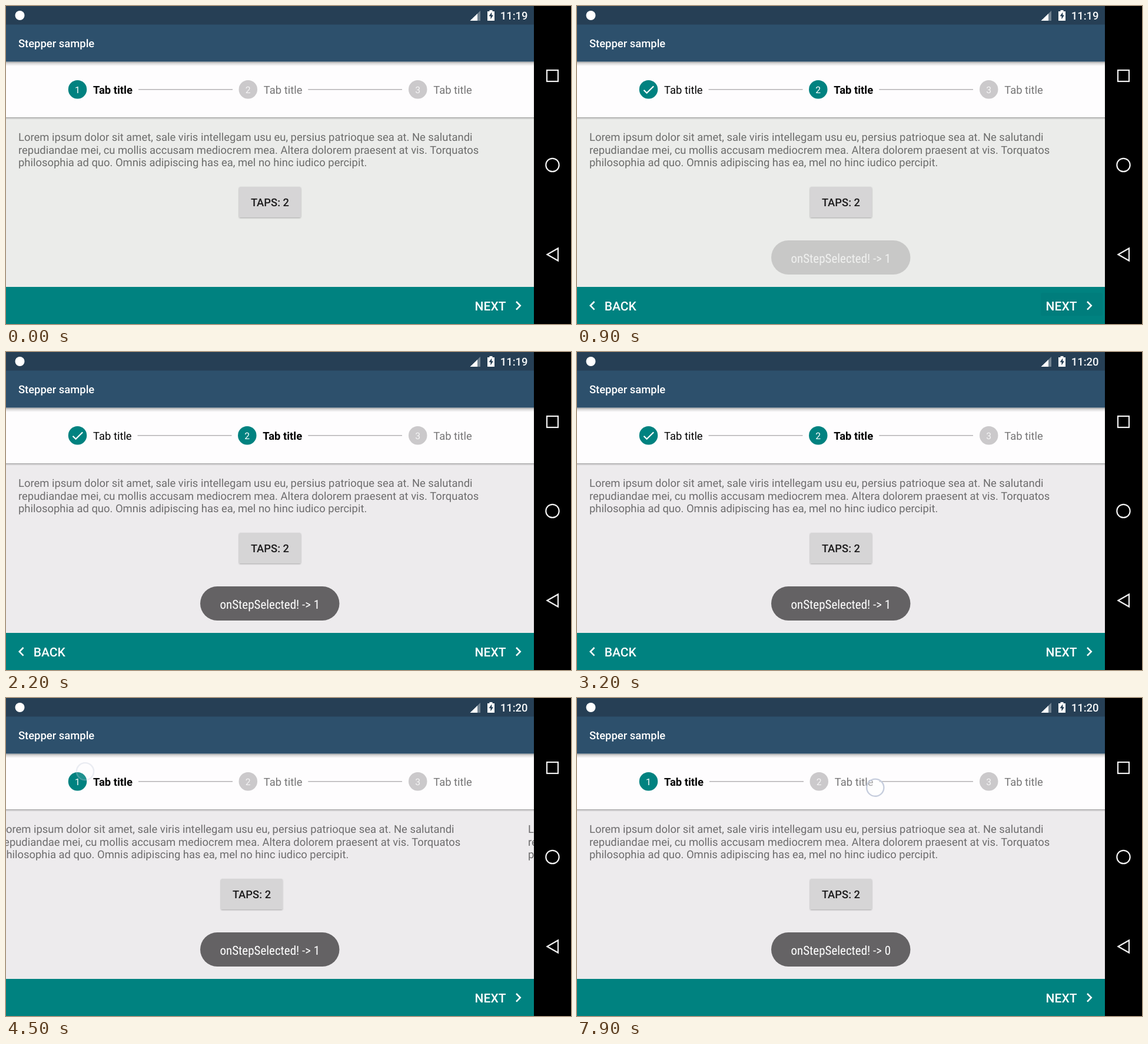
Recreate the animation shown at these times as an HTML page. Size 960 by 540 pixels, loop 8000 ms.

```html
<!DOCTYPE html>
<html lang="en">
<head>
<meta charset="utf-8">
<title>Stepper sample</title>
<style>
  html, body { margin: 0; width: 100%; height: 100%; overflow: hidden; background: #000; }
  svg { display: block; width: 960px; height: 540px; }
  text { font: 400 18.42px Roboto, sans-serif; white-space: pre; text-rendering: geometricPrecision; }
  .medium { font-weight: 500; }
  .action { font-weight: 500; font-size: 21px; fill: #fff; }
  .line { fill: none; stroke: #fff; stroke-width: 2.6; }
  .nav { fill: none; stroke: #f2f2f2; stroke-width: 2.2; }
  .toast text { font-family: "Roboto Condensed", Roboto, sans-serif; font-stretch: 75%; font-size: 21px; fill: #fff; }
  .number { font-size: 15.75px; fill: #fff; text-anchor: middle; }
</style>
</head>
<body>
<svg viewBox="0 0 960 540">
  <defs>
    <linearGradient id="shade" x2="0" y2="1">
      <stop stop-color="#000" stop-opacity=".36"/>
      <stop offset=".4" stop-color="#000" stop-opacity=".14"/>
      <stop offset="1" stop-color="#000" stop-opacity="0"/>
    </linearGradient>
    <filter id="lift" x="-10%" y="-15%" width="120%" height="135%">
      <feDropShadow dx="0" dy="1" stdDeviation="1.2" flood-opacity=".3"/>
    </filter>
    <clipPath id="screen"><rect width="897" height="540"/></clipPath>
    <g id="page">
      <g fill="#000" fill-opacity=".54">
        <text x="21" y="229.4">Lorem ipsum dolor sit amet, sale viris intellegam usu eu, persius patrioque sea at. Ne salutandi</text>
        <text x="21" y="250.9">repudiandae mei, cu mollis accusam mediocrem mea. Altera dolorem praesent at vis. Torquatos</text>
        <text x="21" y="272.4">philosophia ad quo. Omnis adipiscing has ea, mel no hinc iudico percipit.</text>
      </g>
      <rect x="396" y="307" width="105" height="52" rx="2.6" fill="#d6d5d6" filter="url(#lift)"/>
      <text class="medium" x="448.5" y="340" text-anchor="middle" fill="#1c1b1c">TAPS: 2</text>
    </g>
  </defs>

  <g clip-path="url(#screen)">
    <rect id="back" width="897" height="540"/>
    <use id="first" href="#page"/>
    <use id="second" href="#page"/>

    <rect y="189" width="897" height="4" fill="url(#shade)"/>
    <rect y="90" width="897" height="99" fill="#fefdfe"/>
    <rect y="94.5" width="897" height="7.5" fill="url(#shade)"/>
    <g id="tabs"></g>

    <rect width="897" height="94.5" fill="#2d506c"/>
    <rect width="897" height="31.5" fill="#263f55"/>
    <text class="medium" x="21" y="70" fill="#fff">Stepper sample</text>
    <circle cx="23.5" cy="16" r="8" fill="#fff"/>
    <path d="M788.5 25L806 8V25Z" fill="#fff" fill-opacity=".35"/>
    <path d="M788.5 25L801 13V25Z" fill="#fff"/>
    <path d="M818 9H821.5V7H826.5V9H830V25H818Z" fill="#fff"/>
    <path d="M825.3 10.5L820.5 17.3H823.4V22.5L828 15.6H825.3Z" fill="#263f55"/>
    <text id="clock" class="medium" x="886.5" y="22.7" text-anchor="end" fill="#f7f9fa"></text>

    <rect y="477" width="897" height="63" fill="#008280"/>
    <rect id="press" x="788" y="487" width="105" height="39" rx="2.6"/>
    <text class="action" x="796.6" y="516.8">NEXT</text>
    <path class="line" d="M867 502L873.7 508.8L867 515.6"/>
    <g id="previous">
      <text class="action" x="46.8" y="516.8">BACK</text>
      <path class="line" d="M29.5 502L22.8 508.8L29.5 515.6"/>
    </g>

    <g class="toast" id="toast1">
      <rect x="330" y="398" width="236.5" height="58" rx="29" fill="#646264"/>
      <text x="363.5" y="435.5">onStepSelected! -&gt; 1</text>
    </g>
    <g class="toast" id="toast0">
      <rect x="330" y="398" width="236.5" height="58" rx="29" fill="#656365"/>
      <text x="363.5" y="435.5">onStepSelected! -&gt; 0</text>
    </g>
    <circle id="touch" r="14.6" fill="#fff" fill-opacity=".35" stroke="#c6cddd" stroke-width="2.4"/>
  </g>

  <rect x="897" width="63" height="540"/>
  <rect class="nav" x="919" y="109" width="19" height="19"/>
  <circle class="nav" cx="928.5" cy="270" r="11.2"/>
  <path class="nav" d="M938 411.5V432.5L919.5 422Z"/>
</svg>

<script>
const LOOP = 8000, STEP = 100, WIDTH = 897;
const FORWARD = 702, BACKWARD = 4402;
const TAB_Y = 141.75;
const touches = [
  { at: 500, x: 845, y: 511 },
  { at: 4200, x: 134.5, y: 124.7 },
  { at: 7900, x: 506.8, y: 152.2 }
];
const $ = id => document.getElementById(id);
const clamp = v => Math.min(1, Math.max(0, v));
const mix = (a, b, p) => a + (b - a) * p;
const easeSlide = p => 1 + (p - 1) ** 5;
const easeOut = p => 1 - (1 - p) ** 2;
const show = (id, alpha) => $(id).setAttribute('opacity', alpha);
const moveTo = (id, x) => $(id).setAttribute('transform', `translate(${x} 0)`);

function tab(number, cx, state) {
  const on = state !== 'idle';
  const mark = state === 'done'
    ? `<path class="line" style="stroke-width:2.2" d="M${cx - 8} 142.7L${cx - 3} 147.8L${cx + 8.7} 136.2"/>`
    : `<text class="number" x="${cx}" y="148" fill-opacity="${on ? 1 : .8}">${number}</text>`;
  return `<circle cx="${cx}" cy="${TAB_Y}" r="15.75" fill="${on ? '#008280' : '#cbc9cb'}"/>${mark}
    <text x="${cx + 26.5}" y="149" style="font-weight:${state === 'active' ? 700 : 400}"
      fill-opacity="${on ? 1 : .54}">Tab title</text>`;
}

const rule = (x1, x2) => `<path d="M${x1} ${TAB_Y}H${x2}" stroke="#b4b2b4" stroke-width="1.4"/>`;

let shownTab = -1;
function drawTabs(active) {
  if (active === shownTab) return;
  shownTab = active;
  const shift = active ? 1.5 : 0;
  $('tabs').innerHTML =
    tab(1, 121.5, active ? 'done' : 'active') +
    rule(225 - shift, 385 - shift) +
    tab(2, 411.3 - shift, active ? 'active' : 'idle') +
    rule(513.3, 673) +
    tab(3, 699.7, 'idle');
}

function touchAlpha(age) {
  if (age < 0 || age >= 400) return 0;
  return age < 300 ? 1 : .35;
}

function draw(time) {
  const t = Math.floor(time % LOOP / STEP) * STEP;
  const active = t >= 700 && t < 4400 ? 1 : 0;
  drawTabs(active);
  show('previous', active);

  const page = easeSlide(clamp((t - FORWARD) / 200)) - easeSlide(clamp((t - BACKWARD) / 200));
  moveTo('first', -WIDTH * page);
  moveTo('second', WIDTH * (1 - page));

  const tint = clamp((t - 1300) / 900);
  $('back').setAttribute('fill', `rgb(${mix(235, 237, tint)},${mix(236, 235, tint)},${mix(234, 237, tint)})`);
  $('clock').textContent = t < 3200 ? '11:19' : '11:20';

  show('toast1', easeOut(clamp((t - 833) / 500)) * (1 - clamp((t - 4650) / 500) ** 2));
  show('toast0', easeOut(clamp((t - 4650) / 500)));
  show('press', t < 600 || t > 1000 ? 0 : .1 * (1 - clamp((t - 700) / 300)));

  const touch = touches.findLast(p => t >= p.at) || touches[0];
  $('touch').setAttribute('cx', touch.x);
  $('touch').setAttribute('cy', touch.y);
  show('touch', touchAlpha(t - touch.at));
}

// Without a condensed face, a smaller size keeps the label inside its pill.
for (const label of document.querySelectorAll('.toast text'))
  if (label.getComputedTextLength() > 180) label.style.fontSize = '18.6px';

const start = performance.now();
function tick() {
  draw(performance.now() - start);
  requestAnimationFrame(tick);
}
tick();
</script>
</body>
</html>
```
